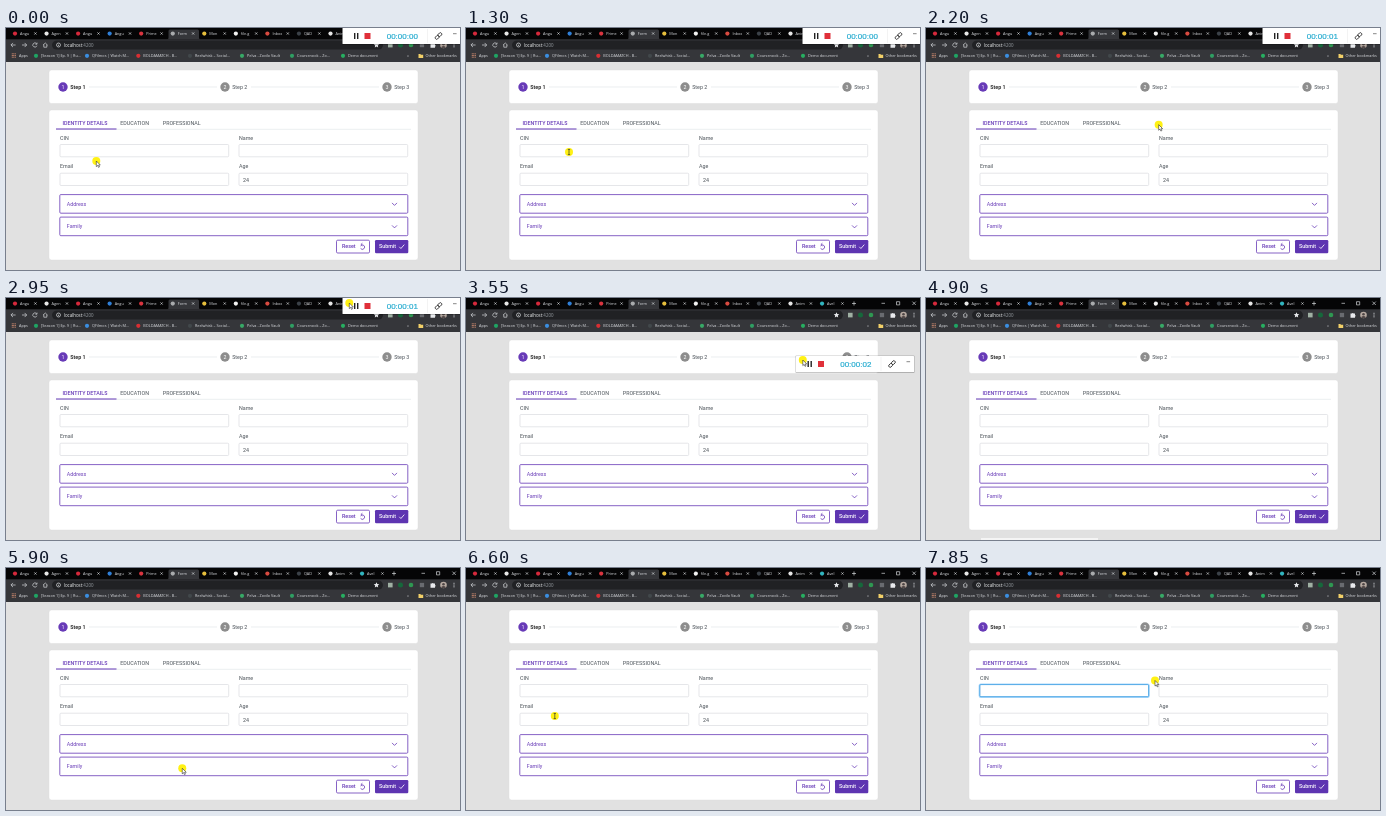
An HTML page for the animation above (8000 ms loop, 454 by 242 pixels).

```html
<!DOCTYPE html>
<html lang="en">
<head>
<meta charset="utf-8">
<title>Form recording</title>
<style>
  html, body { margin: 0; width: 100%; height: 100%; overflow: hidden; background: #e1e1e1; }
  svg { display: block; width: 454px; height: 242px; }
  text { font: 5.33px Roboto, sans-serif; fill: #495057; white-space: pre; }
  .chrome text { font: 3.8px "Open Sans", sans-serif; fill: #dfe1e5; }
  .chrome .url { font-size: 4.4px; fill: #9aa0a6; }
  .chrome .host { fill: #f1f3f4; }
  .purple { fill: #673ab7; }
  .bold { font-weight: 500; }
  .white { fill: #fff; }
  .line { fill: none; stroke: #673ab7; stroke-width: .8; }
  .icon { fill: none; stroke: #d5d7da; stroke-width: .7; }
  .card { fill: #fff; stroke: #d8d8d8; stroke-width: .4; }
  .input { fill: #fff; stroke: #d3d6da; stroke-width: .6; }
  .timer { font: 8px "Liberation Sans", Arial, sans-serif; fill: #27acd0; stroke: #27acd0; stroke-width: .2; }
</style>
</head>
<body>
<svg viewBox="0 0 454 242">
  <rect width="454" height="242" fill="#e1e1e1"/>

  <g class="chrome">
    <rect width="454" height="34" fill="#35363a"/>
    <rect width="454" height="11.3" fill="#050506"/>
    <path d="M161 11.3q1.5 0 1.5-1.5V3q0-1.5 1.5-1.5h27.5q1.5 0 1.5 1.5v6.8q0 1.5 1.5 1.5z" fill="#35363a"/>
    <g id="tabs"></g>
    <path class="icon" d="M386 5.5h4m-2-2v4M415.5 5.3h3.5M430.5 3.7h3.2v3.2h-3.2zM446.4 3.6l3.4 3.4m0-3.4l-3.4 3.4"/>
    <rect x="46" y="12.6" width="331" height="9" rx="4.5" fill="#202124"/>
    <path class="icon" d="M9.6 17H5m2-2.1L4.9 17 7 19.1M16 17h4.6m-2-2.1l2.1 2.1-2.1 2.1M30.6 15.7a2.1 2.1 0 1 0 .3 2M31 14.6v1.6h-1.6M37 17.2l2.3-2.2 2.3 2.2m-3.8-.6v2.6h3v-2.6"/>
    <circle class="icon" cx="52.5" cy="17" r="2"/>
    <path class="icon" d="M52.5 16.8v1.3m0-2.3v.4"/>
    <text class="url" x="57.8" y="18.8"><tspan class="host">localhost</tspan>:4200</text>
    <path d="M370.5 14.3l.8 1.8 2 .2-1.5 1.3.4 2-1.7-1-1.7 1 .4-2-1.5-1.3 2-.2z" fill="#e8eaed"/>
    <rect x="382" y="14.8" width="4.6" height="4.6" fill="#9fb0a3"/>
    <circle cx="394.5" cy="17" r="2.5" fill="#16683b"/>
    <circle cx="405" cy="17" r="2.3" fill="#2f9852"/>
    <rect x="413.8" y="14.9" width="4.3" height="4.3" fill="#696b70"/>
    <path d="M424.5 15.6h1.3a1 1 0 0 1 1.9 0H429v1.3a1 1 0 0 1 0 1.8v1h-4.5z" fill="#e8eaed"/>
    <circle cx="437.5" cy="17" r="3.3" fill="#b7aaa1"/>
    <path d="M435 19.2q2.5-2.6 5 0-2.5 2-5 0z" fill="#514848"/>
    <circle cx="437.5" cy="16.2" r="1.3" fill="#514848"/>
    <path d="M448 14.8v.9m0 .9v.9m0 .9v.9" stroke="#e8eaed"/>
    <g id="marks"></g>
    <path d="M5.8 25.8h4m-4 1.7h4m-4 1.7h4" stroke="#cf8b70" stroke-dasharray="1 .5"/>
    <text x="401" y="29.3">»</text>
    <path d="M412.5 26h1.8l.7.7h2.2v3.2h-4.7z" fill="#f1cf68"/>
    <text x="419.6" y="29.3">Other bookmarks</text>
  </g>

  <rect class="card" x="43" y="42" width="369" height="33.5" rx="2.5"/>
  <path d="M83 59h128M245 59h128" stroke="#dee2e6" stroke-width=".6"/>
  <g id="steps"></g>

  <rect class="card" x="43" y="82" width="369" height="150" rx="2.5"/>
  <path d="M50 101.3h355" stroke="#dee2e6" stroke-width=".6"/>
  <path d="M50 101h60.5" stroke="#673ab7"/>
  <text class="purple bold" x="56.5" y="96.6">IDENTITY DETAILS</text>
  <text x="114.3" y="96.6">EDUCATION</text>
  <text x="156.8" y="96.6">PROFESSIONAL</text>
  <g id="fields"></g>
  <text x="237" y="153.5">24</text>
  <g id="focus" fill="none">
    <rect x="53.4" y="116.2" width="169.6" height="12.9" rx="1.4" stroke="#a9d8fb" stroke-width="1.6"/>
    <rect x="53.8" y="116.6" width="168.8" height="12.1" rx="1" stroke="#3399e0" stroke-width=".7"/>
  </g>
  <g id="panels"></g>

  <rect class="line" x="330.5" y="212.2" width="33" height="12.8" rx="1.2"/>
  <text class="purple bold" x="336" y="220.4">Reset</text>
  <path class="line" d="M354.5 218a2.2 2.2 0 1 1 .1 2.4M356.4 215.2l-1.5 1.3 1.5 1.4"/>
  <rect class="purple" x="369" y="212" width="33.3" height="13.3" rx="1.2" style="fill:#5e35b1"/>
  <text class="white bold" x="373" y="220.4">Submit</text>
  <path d="M393.3 218.8l1.6 1.7 3.4-3.9" fill="none" stroke="#fff" stroke-width=".8"/>

  <rect id="preview" x="55" y="240" width="117" height="3" fill="#f5f5f5"/>

  <g id="recorder">
    <rect x="-.6" y="-.4" width="119.2" height="17.4" rx="1" fill="#000" opacity=".22"/>
    <rect width="118" height="16" rx=".6" fill="#fff"/>
    <path d="M12.2 5v6M15.2 5v6" stroke="#222" stroke-width="1.4"/>
    <rect x="22" y="5" width="6" height="6" fill="#e0303a"/>
    <path d="M85 1v14" stroke="#e6e6e6" stroke-width=".5"/>
    <text id="timer" class="timer" x="44.2" y="11"></text>
    <g transform="translate(96 8) rotate(-45)" fill="none" stroke="#333" stroke-width=".9">
      <rect x="-4" y="-1.4" width="4.2" height="2.8" rx="1.2"/>
      <rect x="-.2" y="-1.4" width="4.2" height="2.8" rx="1.2"/>
    </g>
    <path d="M110.5 5.7h3.6" stroke="#555" stroke-width=".7"/>
  </g>

  <g id="cursor">
    <circle r="4" fill="#fff000" opacity=".92"/>
    <path id="arrow" d="M0 0v5.6l1.3-1.2.9 2 1-.5-.9-1.9h1.7z" fill="#fff" stroke="#222" stroke-width=".55"/>
    <path id="beam" d="M-1.2-2.6H1.2M0-2.6V2.6M-1.2 2.6H1.2" stroke="#333" stroke-width=".7"/>
  </g>
</svg>
<script>
const $ = id => document.getElementById(id);
const fill = (id, items, draw) => { $(id).innerHTML = items.map(draw).join(''); };
const dot = (x, y, color) => `<circle cx="${x}" cy="${y}" r="2.1" fill="${color}"/>`;

const tabs = [
  ['Angu', '#d6283b'], ['Agen', '#e8e8e8'], ['Angu', '#d6283b'], ['Angu', '#2f7fd8'],
  ['Prime', '#d8343f'], ['Form', '#a9abad'], ['Mon', '#e5bd3c'], ['file.g', '#f2f2f2'],
  ['Inbox', '#d84a40'], ['QAD', '#3b4148'], ['Anim', '#e6e6e6'], ['Avel', '#31b5bf']];
fill('tabs', tabs, ([name, color], i) => {
  const x = 9 + 31.55 * i;
  return dot(x, 5.6, color) + `<text x="${x + 5}" y="7">${name}</text>` +
    `<path class="icon" d="M${x + 19.3} 4.4l2.2 2.2m0-2.2l-2.2 2.2"/>`;
});

const marks = [
  [13, 'Apps'], [35, '[Season 1] Ep. 9 | Ru...', '#1fa463'],
  [86, 'QFilmos | Watch M...', '#3b8ee0'], [137.3, 'BOLDAMATCH - B...', '#d92e32'],
  [189, 'Reelwhisk – Social...', '#42484b'], [241, 'Pelva - Zovilo Vault', '#37a866'],
  [291, 'Coursenook – Zo...', '#2f9e62'], [342, 'Demo document', '#27ae60']];
fill('marks', marks, ([x, name, color]) =>
  (color ? dot(x - 5, 27.8, color) : '') + `<text x="${x}" y="29.3">${name}</text>`);

fill('steps', [57, 219, 381], (x, i) =>
  `<circle cx="${x}" cy="59" r="4.7" fill="${i ? '#8d8d8d' : '#673ab7'}"/>
   <text class="white" x="${x}" y="60.9" text-anchor="middle">${i + 1}</text>
   <text x="${x + 7.2}" y="60.9"${i ? '' : ' style="font-weight:700;fill:#333"'}>Step ${i + 1}</text>`);

const fields = [[54, 116.5, 'CIN'], [233, 116.5, 'Name'], [54, 145.2, 'Email'], [233, 145.2, 'Age']];
fill('fields', fields, ([x, y, name]) =>
  `<text x="${x}" y="${y - 5}">${name}</text>
   <rect class="input" x="${x}" y="${y}" width="168.7" height="12.3" rx="1"/>`);

fill('panels', [['Address', 166.6], ['Family', 189.1]], ([name, y]) =>
  `<rect class="line" x="53.8" y="${y}" width="348" height="18.6" rx="1"/>
   <text class="purple" x="60.8" y="${y + 11.1}">${name}</text>
   <path class="line" d="M386 ${y + 8.3}l2.5 2.5 2.5-2.5"/>`);

// Waypoints: time, x, y
const cursorPath = [
  [100, 90.3, 133], [600, 93.5, 130.5], [900, 93.5, 130.5], [1100, 102, 125], [1250, 102, 125],
  [1300, 103, 124], [1750, 103, 124], [1950, 190, 103], [2050, 190, 103], [2500, 318, 84],
  [2750, 318, 84], [2950, 343.3, 5], [3350, 343.3, 5], [3550, 336.8, 62], [4200, 336.8, 250],
  [5350, 120, 250], [5400, 125, 246], [5800, 185, 205], [6200, 150, 186], [6600, 88.8, 148],
  [7000, 80, 123], [7550, 80, 123], [7850, 229, 112.5]];
const recorderPath = [[3350, 336.5, 0], [3550, 330, 58], [4200, 330, 246]];

function at(path, t) {
  const i = path.findIndex(p => p[0] > t);
  if (i < 0) return path[path.length - 1].slice(1);
  if (!i) return path[0].slice(1);
  const [t0, x0, y0] = path[i - 1], [t1, x1, y1] = path[i];
  const k = (t - t0) / (t1 - t0);
  return [x0 + (x1 - x0) * k, y0 + (y1 - y0) * k];
}

const move = (id, [x, y]) => $(id).setAttribute('transform', `translate(${x} ${y})`);
const show = (id, on) => $(id).setAttribute('opacity', +on);

function frame(now) {
  const t = Math.floor(now % 8000 / 50) * 50;
  const pos = at(cursorPath, t);
  const typing = fields.some(([x, y]) =>
    pos[0] > x && pos[0] < x + 168.7 && pos[1] > y && pos[1] < y + 12.3);
  move('cursor', pos);
  show('beam', typing);
  show('arrow', !typing);
  move('recorder', at(recorderPath, t));
  $('timer').textContent = '00:00:0' + ((t >= 1950) + (t >= 3000));
  show('focus', Math.min(1, Math.max(0, (t - 7150) / 250)));
  show('preview', t >= 4850 && t < 5450);
  requestAnimationFrame(frame);
}
frame(performance.now());
</script>
</body>
</html>
```
